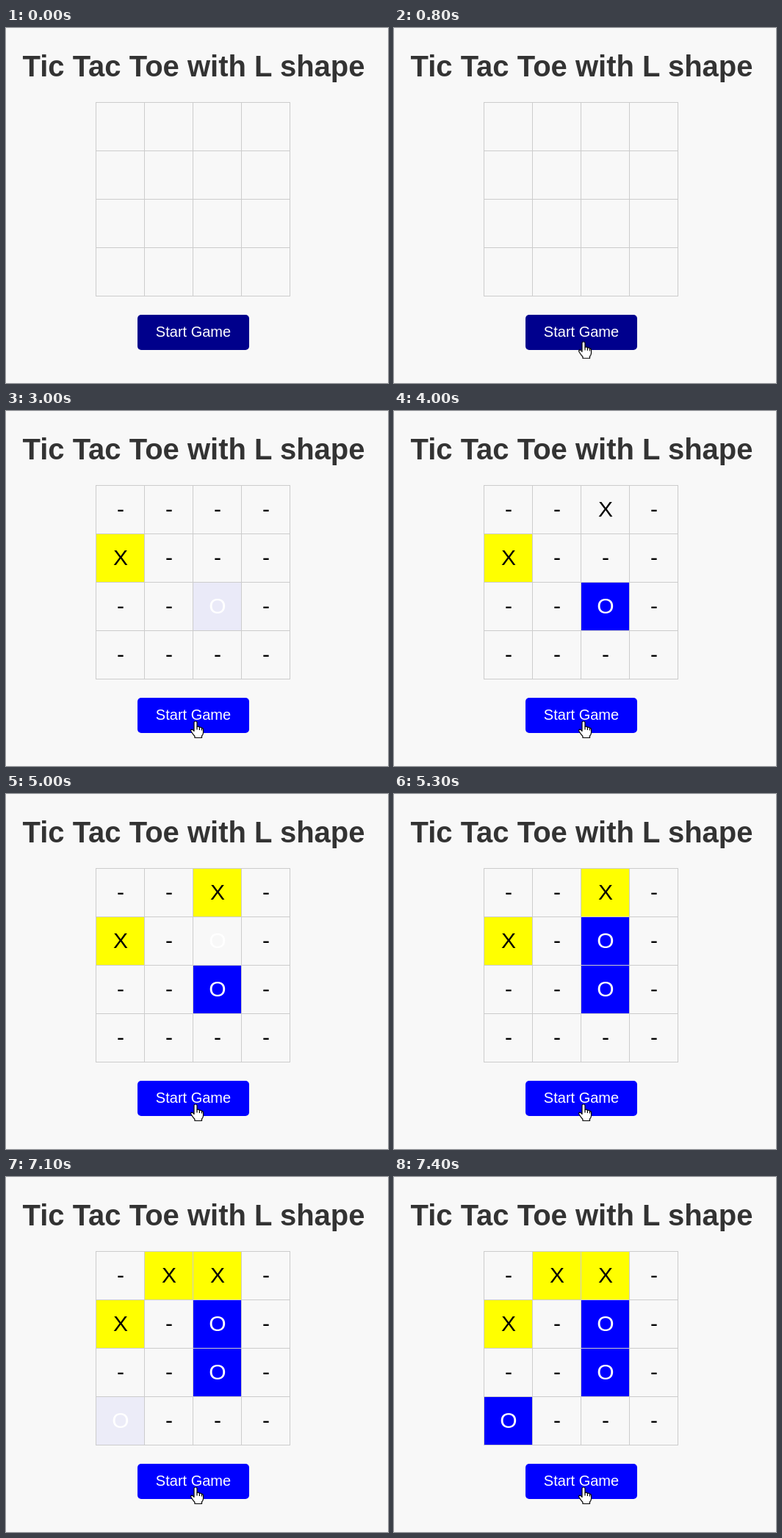
Write an HTML page that moves like this. It is 520 px wide and 484 px high and loops after 8000 ms.

```html
<!DOCTYPE html>
<html lang="en">
<head>
<meta charset="utf-8">
<title>Tic Tac Toe with L shape</title>
<style>
  html, body { margin: 0; width: 100%; height: 100%; overflow: hidden; background: #f8f8f8; }
  svg { display: block; }
  text { font-family: "Liberation Sans", Arial, sans-serif; text-anchor: middle; }
  h1, .title { font-size: 40px; font-weight: bold; fill: #333; }
  .label { font-size: 20px; fill: #fff; }
  .mark { font-size: 30px; }
  .lines { fill: none; stroke: #ccc; }
  .pointer { fill: #fff; stroke: #000; stroke-width: 1.2; stroke-linejoin: round; }
</style>
</head>
<body>
<svg width="520" height="484" viewBox="0 0 520 484">
  <text class="title" x="255.5" y="66">Tic Tac Toe with L shape</text>
  <g id="cells"></g>
  <path id="lines" class="lines"/>
  <rect id="button" x="179" y="391" width="152" height="48" rx="5" fill="#00008b"/>
  <text class="label" x="255" y="421">Start Game</text>
  <g id="cursor" class="pointer">
    <path id="arrow" d="M0 0V17L4 13.2L6.6 19.4L9.4 18.2L6.8 12.2H12Z"/>
    <g id="hand">
      <path d="M-2 1.5Q-2 0 0 0Q2 0 2 1.5V7.5Q4.8 6.2 5.4 8.5Q7.8 7.4 8.5 9.5Q10.5 9 10.5 11.5V15.5Q10.5 18 8.5 20V22.5H-1V20.5Q-3.5 18 -6 13.8Q-7 11.4 -5 11.2Q-3.6 11.2 -2 13.5Z"/>
      <path d="M2 7.5V11.5M5.4 8.5V12M8.5 9.5V12.5" fill="none"/>
    </g>
  </g>
</svg>
<script>
const LOOP = 8000, TICK = 100, SIZE = 66, LEFT = 122, TOP = 101;
const PAPER = '#f8f8f8';
const CLICK = 1000;
const COLORS = { X: '#ffff00', O: '#0000ff' };

// shown: mark appears; fade: background transition begins
const MOVES = [
  { mark: 'X', row: 1, col: 0, shown: 2000, fade: 1980 },
  { mark: 'O', row: 2, col: 2, shown: 3000, fade: 2978 },
  { mark: 'X', row: 0, col: 2, shown: 4000, fade: 4010 },
  { mark: 'O', row: 1, col: 2, shown: 5000, fade: 5010 },
  { mark: 'X', row: 0, col: 1, shown: 6000, fade: 6005 },
  { mark: 'O', row: 3, col: 0, shown: 7100, fade: 7080 },
];

const byId = id => document.getElementById(id);
const [cellLayer, button, cursor, arrow, hand] =
  ['cells', 'button', 'cursor', 'arrow', 'hand'].map(byId);

function add(name, attrs) {
  const node = document.createElementNS('http://www.w3.org/2000/svg', name);
  for (const key in attrs) node.setAttribute(key, attrs[key]);
  return cellLayer.appendChild(node);
}

const animations = [];
function play(node, frames, options) {
  const animation = node.animate(frames, { fill: 'both', ...options });
  animation.pause();
  animations.push(animation);
}
function fade(node, from, to, delay) {
  play(node, [{ fill: from }, { fill: to }], { delay, duration: 300, easing: 'ease' });
}

const cells = [];
let grid = '';
for (let i = 0; i <= 4; i++) {
  const x = LEFT + i * SIZE + 0.5, y = TOP + i * SIZE + 0.5;
  grid += `M${x} ${TOP}v${4 * SIZE + 1}M${LEFT} ${y}h${4 * SIZE + 1}`;
}
byId('lines').setAttribute('d', grid);

for (let row = 0; row < 4; row++) {
  for (let col = 0; col < 4; col++) {
    const x = LEFT + col * SIZE, y = TOP + row * SIZE;
    const move = MOVES.find(m => m.row === row && m.col === col);
    const rect = add('rect', { x, y, width: SIZE, height: SIZE, fill: PAPER });
    const text = add('text', { x: x + 34, y: y + 43, class: 'mark' });
    if (move) fade(rect, PAPER, COLORS[move.mark], move.fade);
    cells.push({ text, move });
  }
}

fade(button, '#00008b', '#0000ff', 790);
play(cursor, [
  { transform: 'translate(258px, 478px)' },
  { transform: 'translate(258px, 423px)' },
], { delay: 480, duration: 420, easing: 'ease-out' });

function render(time) {
  for (const animation of animations) animation.currentTime = time;
  for (const { text, move } of cells) {
    const played = move && time >= move.shown;
    text.textContent = played ? move.mark : time >= CLICK ? '-' : '';
    text.setAttribute('fill', played && move.mark === 'O' ? '#fff' : '#000');
  }
  cursor.style.visibility = time >= 500 ? 'visible' : 'hidden';
  arrow.style.display = time < 800 ? '' : 'none';
  hand.style.display = time < 800 ? 'none' : '';
}

const start = performance.now();
function frame() {
  const time = (performance.now() - start) % LOOP;
  render(Math.floor(time / TICK) * TICK);
  requestAnimationFrame(frame);
}
render(0);
requestAnimationFrame(frame);
</script>
</body>
</html>
```
